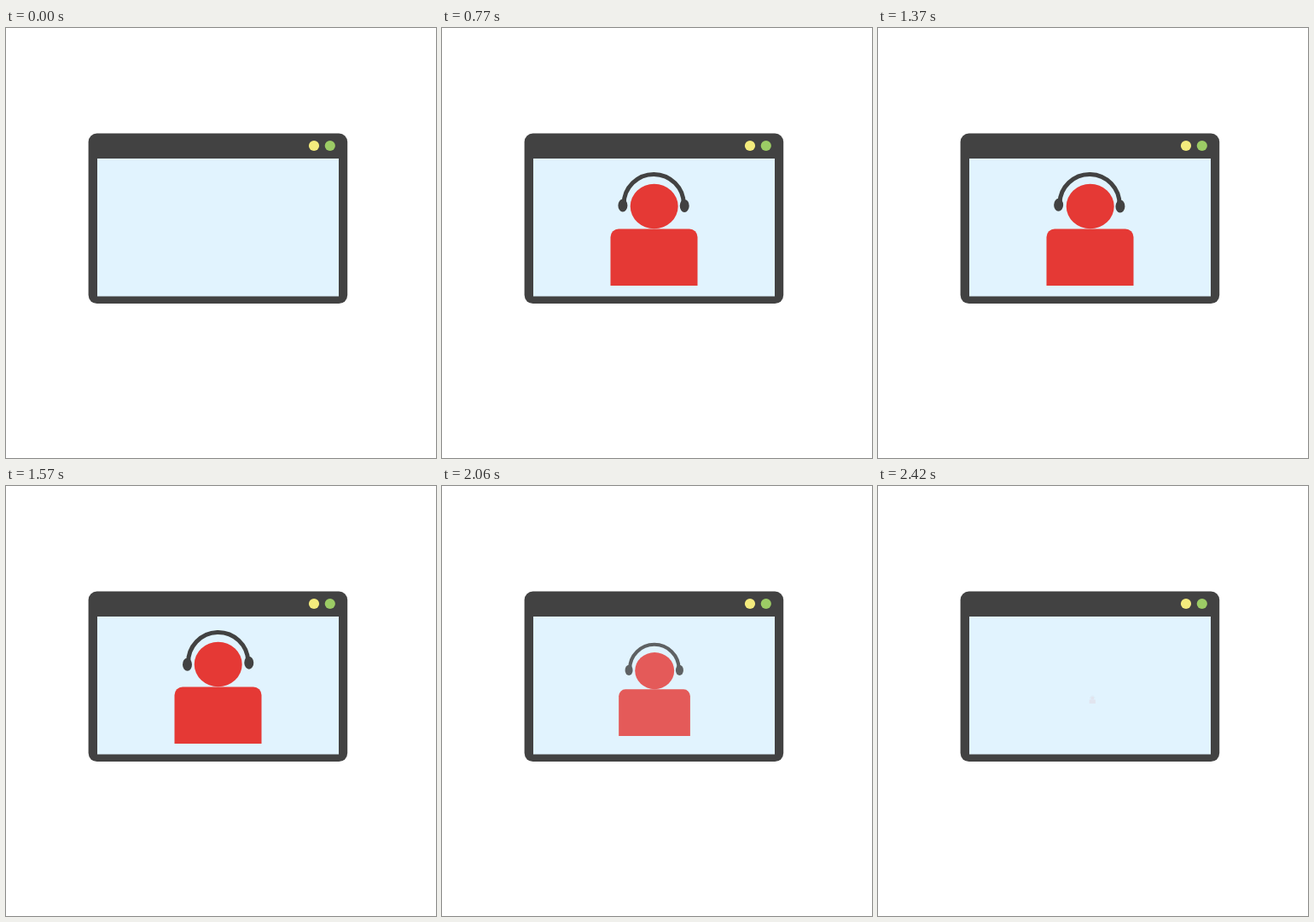
These frames come from a looping animation (504 by 504 pixels, 2500 ms). An HTML page:

```html
<!DOCTYPE html>
<html lang="en">
<head>
<meta charset="utf-8">
<title>Video call</title>
<style>
  html, body { margin: 0; width: 100%; height: 100%; overflow: hidden; background: #fff; }
  svg { display: block; width: 100vw; height: 100vh; }
</style>
</head>
<body>
<svg viewBox="0 0 504 504">
  <rect x="96.6" y="123.5" width="303.6" height="199.6" rx="10" fill="#424242"/>
  <rect x="107" y="153" width="283" height="161.5" fill="#e1f3fe"/>
  <circle cx="361" cy="138" r="6.1" fill="#f3eb7d"/>
  <circle cx="379.8" cy="138" r="6.1" fill="#9ccc65"/>
  <g id="person" opacity="0">
    <g fill="#e53935">
      <path d="M197.5 302V245a9.5 9.5 0 0 1 9.5-9.5h83a9.5 9.5 0 0 1 9.5 9.5v57z"/>
      <ellipse cx="248.7" cy="209" rx="28" ry="26.3"/>
    </g>
    <g id="headset" fill="#424242">
      <path d="M213.2 206.5a35.1 35.1 0 0 1 70.2 0" fill="none" stroke="#424242" stroke-width="5"/>
      <ellipse cx="212" cy="208.2" rx="5.5" ry="7.5"/>
      <ellipse cx="284.3" cy="208.2" rx="5.5" ry="7.5"/>
    </g>
  </g>
</svg>
<script>
  const LOOP = 2500, FADE = 480, STEP = 40;
  const person = document.getElementById('person');
  const headset = document.getElementById('headset');
  const clamp = v => Math.min(1, Math.max(0, v));

  // Hold the time in 40 ms steps, counted from the start of each phase.
  function stepped(t) {
    const start = t < 520 ? 0 : t < 770 ? 520 : t < 1730 ? 770 : t < 1980 ? 1730 : 1980;
    const held = start + Math.floor((t - start) / STEP) * STEP;
    return start === 1980 ? Math.min(held, 2420) : held;
  }

  // Rock to 2, -2, 2, -2 and back to 0 degrees in five equal parts.
  function teeter(p) {
    const keys = [0, 2, -2, 2, -2, 0];
    const x = clamp(p) * 5, i = Math.min(4, Math.floor(x));
    return keys[i] + (keys[i + 1] - keys[i]) * (x - i);
  }

  function draw(now) {
    const t = stepped(now % LOOP);
    const size = Math.min(clamp((t - 4) / FADE), clamp((2454 - t) / FADE));
    const angle = t >= 1730 ? 0 : teeter((t - 738) / 1000);
    person.setAttribute('opacity', size);
    person.setAttribute('transform',
      `translate(251.5 251.4) scale(${size}) translate(-251.5 -251.4)`);
    headset.setAttribute('transform', `rotate(${angle} 248.2 192.5)`);
  }

  const begin = performance.now();
  function frame() {
    draw(performance.now() - begin);
    requestAnimationFrame(frame);
  }
  frame();
</script>
</body>
</html>
```
